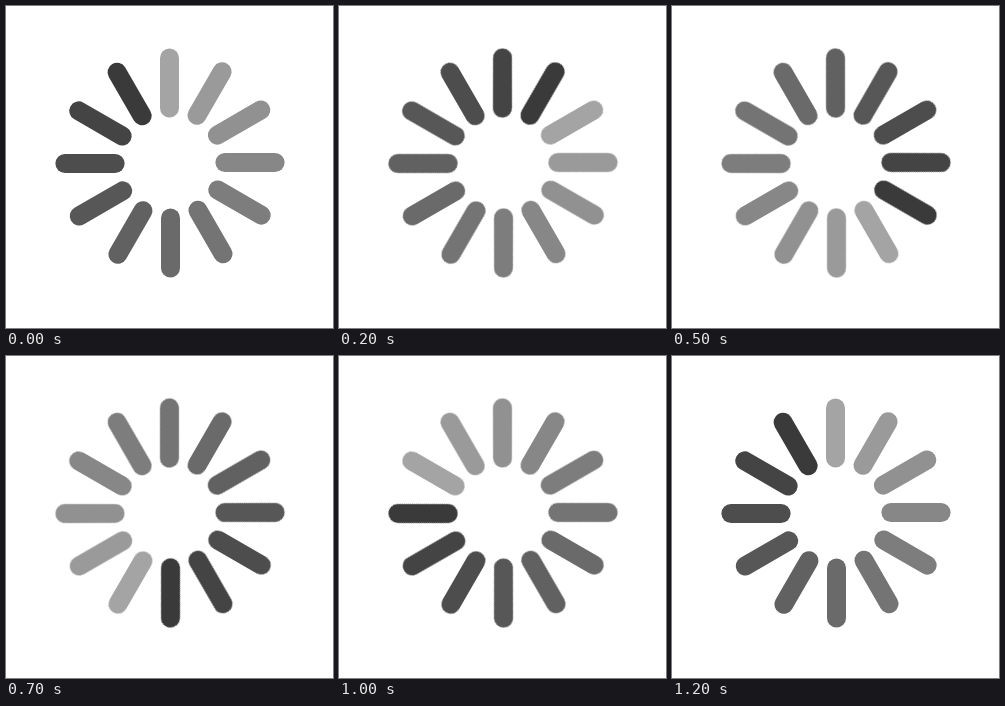
These frames come from a looping animation (327x322 px, 1.3 s). An HTML page:

```html
<!DOCTYPE html>
<html lang="en">
<head>
<meta charset="utf-8">
<title>Loading spinner</title>
<style>
  html, body { margin: 0; width: 100%; height: 100%; overflow: hidden; background: #fff; }
  svg { display: block; width: 327px; height: 322px; }
  line { stroke-width: 19; stroke-linecap: round; }
  /* 13 equal holds; the first and last share the same pose */
  #wheel { transform-origin: 0 0; animation: turn 1300ms steps(13, jump-none) infinite; }
  @keyframes turn { from { transform: rotate(0deg); } to { transform: rotate(360deg); } }
</style>
</head>
<body>
<svg viewBox="0 0 327 322">
  <g transform="translate(164 157)"><g id="wheel"></g></g>
</svg>
<script>
  const wheel = document.getElementById('wheel');
  const count = 12, light = 164, dark = 58;

  for (let i = 0; i < count; i++) {
    const shade = Math.round(light + (dark - light) * i / (count - 1));
    const spoke = document.createElementNS('http://www.w3.org/2000/svg', 'line');
    const attrs = {
      x1: -0.5, y1: -105.1, x2: -0.5, y2: -54.9,
      stroke: `rgb(${shade}, ${shade}, ${shade})`,
      transform: `rotate(${i * 360 / count})`
    };
    for (const key in attrs) spoke.setAttribute(key, attrs[key]);
    wheel.append(spoke);
  }
</script>
</body>
</html>
```
